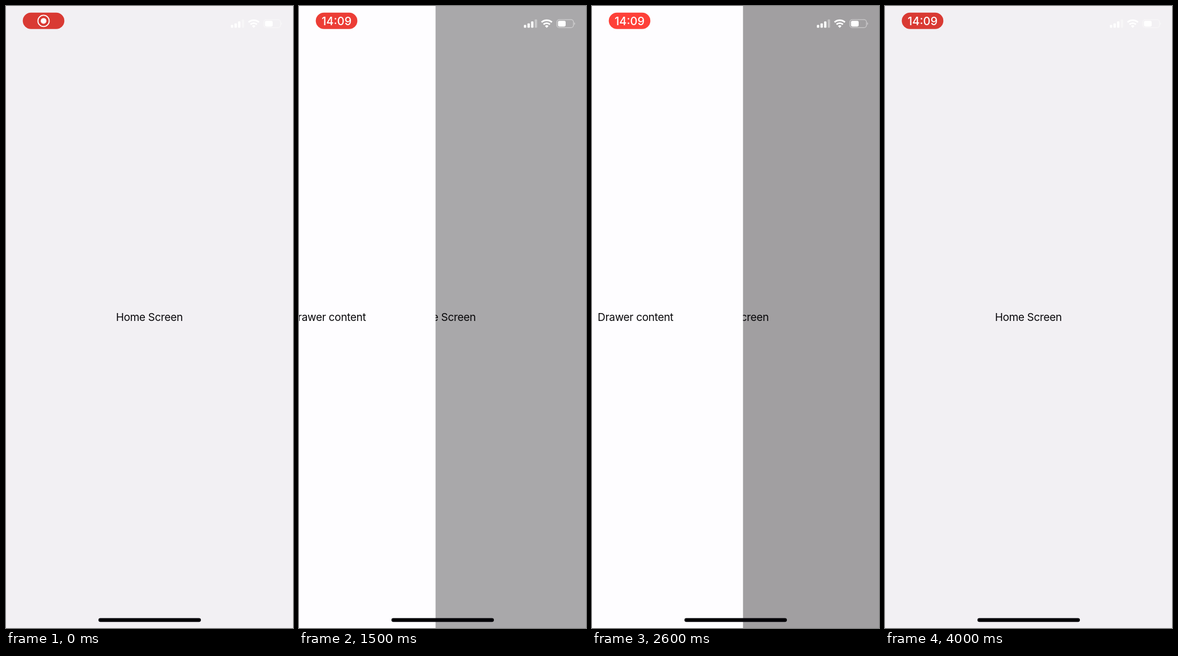
An HTML page for the animation above (4100 ms loop, 508 px wide and 1102 px high).

```html
<!DOCTYPE html>
<html lang="en">
<head>
<meta charset="utf-8">
<title>Drawer</title>
<style>
  html, body { margin: 0; width: 100%; height: 100%; overflow: hidden; background: #f2f0f3; }
  svg { display: block; width: 508px; height: 1102px; }
  text { font-family: Inter, Roboto, sans-serif; text-anchor: middle; }
  .label { font-size: 19px; letter-spacing: -0.32px; fill: #09080b; }
  .clock { font-size: 20px; font-weight: 500; fill: #fff; }
</style>
</head>
<body>
<svg viewBox="0 0 508 1102">
  <rect width="508" height="1102" fill="#f2f0f3"/>
  <text class="label" x="253.8" y="558">Home Screen</text>
  <rect id="shade" width="508" height="1102" fill="#000" opacity="0"/>

  <g id="drawer">
    <rect x="-380" width="380" height="1102" fill="#fefdff"/>
    <text class="label" x="-190.3" y="558">Drawer content</text>
  </g>

  <rect id="pill" x="29.7" y="11.8" width="73.6" height="29" rx="14.5"/>
  <g id="record">
    <circle cx="66.5" cy="26.4" r="10" fill="none" stroke="#fff" stroke-width="1.8"/>
    <circle cx="66.5" cy="26.4" r="5" fill="#fff"/>
  </g>
  <text id="clock" class="clock" x="66.5" y="33.5">14:09</text>

  <g fill="#fff">
    <rect x="398" y="33.6" width="4.2" height="4.9" rx="1.2"/>
    <rect x="404.4" y="30.8" width="4.2" height="7.7" rx="1.2"/>
    <rect x="410.8" y="27.2" width="4.2" height="11.3" rx="1.2"/>
    <rect x="417.2" y="23.8" width="4.2" height="14.7" rx="1.2" opacity=".38"/>
    <g transform="translate(438.5 38.7)">
      <path d="M-9.2-9.9A13.5 13.5 0 0 1 9.2-9.9M-5.7-6.1A8.4 8.4 0 0 1 5.7-6.1" fill="none" stroke="#fff" stroke-width="2.9"/>
      <path d="M0 0L-3.1-3.3A4.5 4.5 0 0 1 3.1-3.3Z"/>
    </g>
    <rect x="456.4" y="24.2" width="29.4" height="14.2" rx="4.3" fill="none" stroke="#fff" stroke-width="1.3" opacity=".45"/>
    <rect x="458.4" y="26.2" width="13.6" height="10.2" rx="2.4"/>
    <path d="M487.2 28.8Q490 31.3 487.2 33.8Z" opacity=".5"/>
  </g>

  <rect x="163.6" y="1084.4" width="181.4" height="6.8" rx="3.4" fill="#030207"/>
</svg>
<script>
  const LOOP = 4100, STEP = 100, OPEN = 379.5;
  const el = id => document.getElementById(id);
  const shade = el('shade'), drawer = el('drawer'), pill = el('pill');
  const record = el('record'), clock = el('clock');
  const clamp = (v, lo, hi) => Math.min(hi, Math.max(lo, v));
  const mix = (a, b, k) => a + (b - a) * k;

  // Drawer edge: [ms, px]
  const path = [
    [1300, 0], [1400, 110], [1500, 241.7], [1600, 334], [1700, 366], [1800, 376],
    [1900, OPEN], [2400, OPEN], [2500, 350], [2600, 267.3], [2700, 112],
    [2800, 22.3], [2900, 5], [3000, 0]
  ];

  function edgeAt(t) {
    const i = path.findIndex(p => p[0] >= t);
    if (i <= 0) return 0;
    const [t0, x0] = path[i - 1], [t1, x1] = path[i];
    return mix(x0, x1, (t - t0) / (t1 - t0));
  }

  function draw(t) {
    const edge = edgeAt(t);
    drawer.setAttribute('transform', `translate(${edge} 0)`);
    shade.setAttribute('opacity', 0.497 * Math.pow(edge / OPEN, 1.1));

    const glow = 0.5 + 0.5 * clamp(-3 * Math.cos(t / 1000 * Math.PI), -1, 1);
    const rgb = [[217, 255], [58, 64], [51, 56]].map(c => Math.round(mix(c[0], c[1], glow)));
    pill.setAttribute('fill', `rgb(${rgb})`);

    const swap = clamp((t - 500) / 300, 0, 1);
    record.setAttribute('opacity', 1 - swap);
    clock.setAttribute('opacity', swap);
  }

  const start = performance.now();
  function tick() {
    const t = (performance.now() - start) % LOOP;
    draw(Math.floor(t / STEP) * STEP);
    requestAnimationFrame(tick);
  }
  tick();
</script>
</body>
</html>
```
